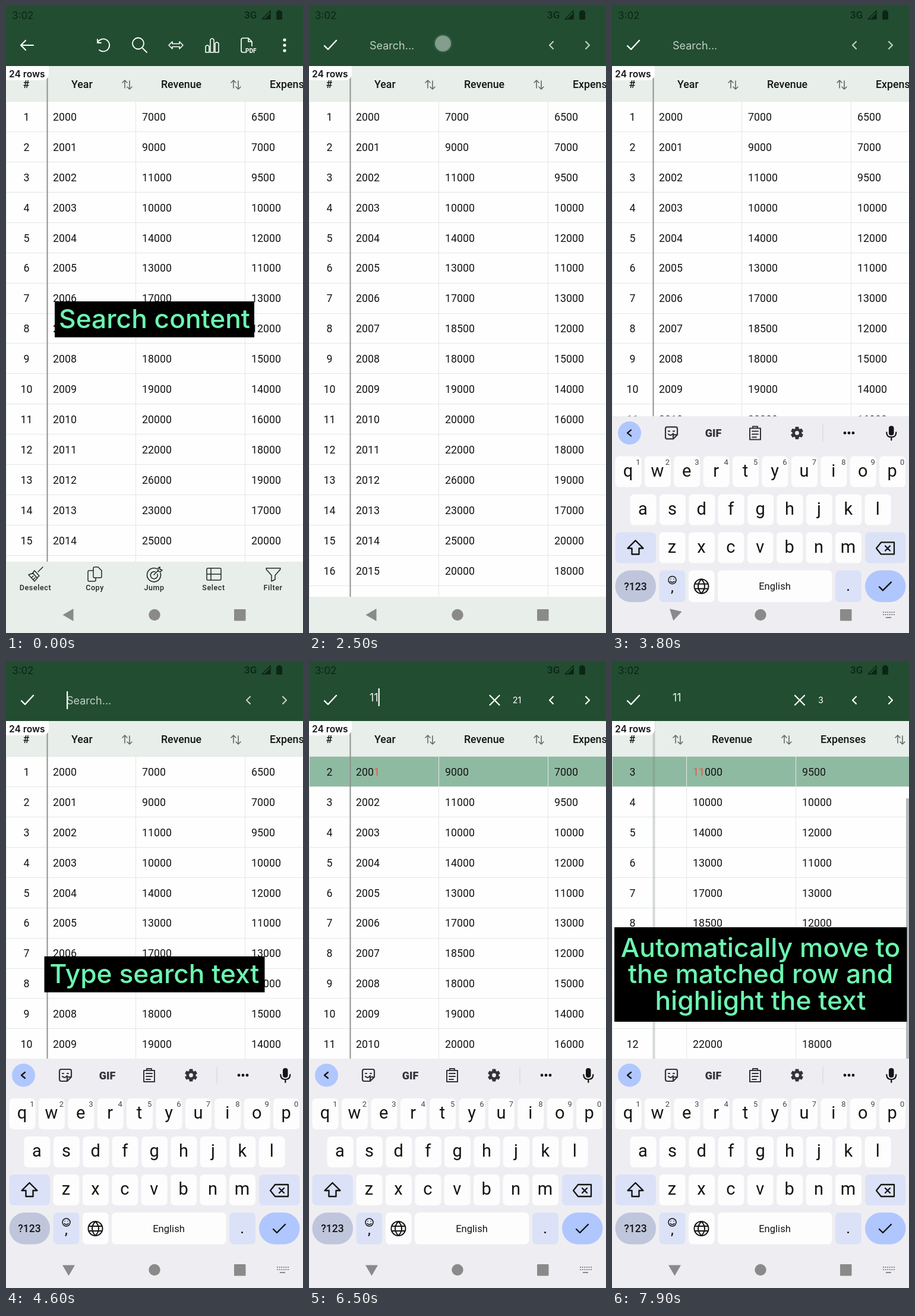
An HTML page with a canvas for the animation above (8 s loop, 500 px wide and 1055 px high).

```html
<!DOCTYPE html>
<html lang="en">
<head>
<meta charset="utf-8">
<title>Table search</title>
<style>
html, body { margin: 0; width: 100%; height: 100%; overflow: hidden; background: #e8eee9 }
canvas { display: block }
</style>
</head>
<body>
<canvas id="stage" width="500" height="1055"></canvas>
<script>
const c = document.getElementById('stage').getContext('2d');
const LOOP = 8000, TAU = Math.PI * 2;
const ROW = 50.93, HEAD = 161, KEYBOARD = 669;
const GREEN = '#224d31', PANEL = '#e8eee9', INK = '#131513', NAV = '#898a89', PALE = '#c0d0c5';
const KEY = '#fdfdfe', KEY_ALT = '#dbe2f8', KEY_BLUE = '#b0c6ff', KEY_BG = '#eeeef2', STRIP_INK = '#32343a';

const revenue = [7, 9, 11, 10, 14, 13, 17, 18.5, 18, 19, 20, 22, 26, 23, 25, 20];
const expenses = [6.5, 7, 9.5, 10, 12, 11, 13, 12, 15, 14, 16, 18, 19, 17, 20, 18];
const rows = revenue.map((r, i) => [2000 + i, r * 1000, expenses[i] * 1000].map(String));
const columns = [
  { title: 'Year', x: 79, titleX: 110, sort: 204, edge: 218 },
  { title: 'Revenue', x: 229, titleX: 261, sort: 387, edge: 402 },
  { title: 'Expenses', x: 413, titleX: 444, sort: 578, edge: 593 }
];

// Times in ms
const AT = { arrow: 1600, captionOff: 2300, touch: 2300, bar: 2500, touchOff: 2700, keys: 3600, caret: 4000,
  ask: 4600, askOff: 5700, one: 5900, eleven: 6400, match: 7000, result: 7300 };

const clamp = v => Math.max(0, Math.min(1, v));

function rect(x, y, w, h, color, radius = 0) {
  c.fillStyle = color;
  c.beginPath();
  c.roundRect(x, y, w, h, radius);
  c.fill();
}

function disc(x, y, r, color) {
  c.fillStyle = color;
  c.beginPath();
  c.arc(x, y, r, 0, TAU);
  c.fill();
}

// y is the middle of the capital letters
function text(s, x, y, size, color = INK, align = 'left', weight = 400, family = 'Roboto') {
  c.font = `${weight} ${size}px ${family}, sans-serif`;
  c.textAlign = align;
  c.fillStyle = color;
  c.fillText(s, x, y + size * 0.356);
  return c.measureText(s).width;
}

function icon(d, x, y, color, width = 2, fill) {
  c.save();
  c.translate(x, y);
  c.lineCap = c.lineJoin = 'round';
  const path = new Path2D(d);
  if (fill) { c.fillStyle = fill; c.fill(path); }
  if (width) { c.strokeStyle = color; c.lineWidth = width; c.stroke(path); }
  c.restore();
}

function clip(x, y, w, h, draw) {
  c.save();
  c.beginPath();
  c.rect(x, y, w, h);
  c.clip();
  draw();
  c.restore();
}

function line(x1, y1, x2, y2) {
  c.strokeStyle = '#e3e8e4';
  c.lineWidth = 1;
  c.beginPath();
  c.moveTo(x1, y1);
  c.lineTo(x2, y2);
  c.stroke();
}

function statusBar() {
  const dark = '#0d2517';
  text('3:02', 10, 16, 17, dark, 'left', 400, 'Inter');
  text('3G', 401, 15, 17, dark, 'left', 500);
  icon('M-7 7H7V-7Z', 438, 15, dark, 1.5);
  icon('M-3 7H7V-3Z', 438, 15, dark, 0, dark);
  rect(455, 9, 10, 14, dark, 1.5);
  rect(457.5, 7, 5, 3, dark);
}

function toolbar() {
  const w = '#fff';
  icon('M11 0H-10M-2 -8L-10 0L-2 8', 35, 66, w, 2.2);
  icon('M-10 -10V-4H-4M-10 -4A10.5 10.5 0 1 1 -7 8', 164, 66, w, 1.8);
  icon('M-12 -3A9.5 9.5 0 1 0 7 -3A9.5 9.5 0 1 0 -12 -3M5 5L12 12', 225, 66, w, 1.8);
  icon('M-12 0L-6 -6V-2.5H6V-6L12 0L6 6V2.5H-6V6Z', 286, 66, w, 1.6);
  icon('M-11 2Q-8 -2 -5 2V12H-11ZM-3 -9Q0 -14 3 -9V12H-3ZM5 -3Q8 -7 11 -3V12H5Z', 347, 66, w, 1.6);
  icon('M-4 12H-8Q-11 12 -11 9V-9Q-11 -12 -8 -12H1L7 -6V1M1 -12V-6H7', 407, 66, w, 1.7);
  text('PDF', 403, 75.5, 10, w, 'left', 700);
  for (const y of [57, 66, 75]) disc(469, y, 2.6, w);
}

function searchBar(t) {
  const found = t >= AT.eleven, tint = found ? '#fff' : PALE;
  icon('M-9 1L-3 7L11 -8', 35, 66, '#fff', 2.4);
  icon('M3 -6L-3 0L3 6', 408, 66, tint, 2.2);
  icon('M-3 -6L3 0L-3 6', 469, 66, tint, 2.2);
  const typed = t < AT.one ? '' : t < AT.eleven ? '1' : '11';
  let caretX = 103;
  if (typed) caretX += text(typed, 102, 61.5, 18, '#e8eeea', 'left', 400, 'Inter');
  else text('Search...', 102, 67, 18, PALE, 'left', 400, 'Inter');
  if (found) {
    const done = t >= AT.match;
    icon('M-8 -8L8 8M8 -8L-8 8', done ? 316 : 312.5, 66, '#fff', 2.2);
    text(done ? '3' : '21', done ? 351.5 : 350, 66, 14.5, '#fff', 'center', 400, 'Inter');
  }
  const blinkStart = found ? AT.eleven : t >= AT.one ? AT.one : AT.ask - 1000;
  if (t >= AT.caret && (t - blinkStart) % 1000 < 500)
    rect(caretX - 1, typed ? 46 : 51, 2.2, 30, '#fff');
}

function table(t, bottom) {
  const first = t < AT.eleven ? 0 : t < AT.match ? 1 : 2;
  const query = ['', '1', '11'][first];
  const shift = 93 * (1 - (1 - clamp((t - AT.match) / 200)) ** 2);
  rect(0, 101, 500, bottom - 101, '#fdfefd');
  rect(0, 101, 500, 60, PANEL);
  if (query) rect(0, HEAD, 500, ROW, '#8fbaa2');

  clip(0, 101, 500, bottom - 101, () => {
    for (let i = first; i < 17; i++) {
      const y = HEAD + (i - first) * ROW;
      line(0, Math.round(y) - .5, 500, Math.round(y) - .5);
      text(i + 1, 34.5, y + 25.5, 17.8, INK, 'center');
    }
    line(.5, HEAD, .5, bottom);
    text('#', 34, 132, 17.8, INK, 'center', 500);
  });

  clip(70, 101, 430, bottom - 101, () => {
    c.translate(-shift, 0);
    columns.forEach((col, k) => {
      text(col.title, col.titleX, 131.5, 17.8, INK, 'left', 500);
      icon('M-4 6V-7M-8 -3L-4 -7L0 -3M4 -6V8M0 4L4 8L8 4', col.sort, 132, '#656a67', 1.6);
      line(col.edge + .5, HEAD, col.edge + .5, bottom);
      rows.slice(first).forEach((row, i) => {
        const y = HEAD + 25.5 + i * ROW, s = row[k];
        const at = query && i === 0 && k === first - 1 ? s.indexOf(query) : -1;
        if (at < 0) return text(s, col.x, y, 17.8);
        let x = col.x + text(s.slice(0, at), col.x, y, 17.8);
        x += text(query, x, y, 17.8, '#f0553c');
        text(s.slice(at + query.length), x, y, 17.8);
      });
    });
  });

  const moved = shift > 0;
  rect(68.5, 101, moved ? 4 : 2, bottom - 101, moved ? 'rgba(120,128,122,.3)' : '#8e928f');
  if (moved) rect(495, 231, 5, bottom - 231, '#b8bab9');
  rect(0, 101, 72, 24, '#fff', [0, 0, 10, 0]);
  text('24 rows', 5, 114, 15.6, '#111', 'left', 600, 'Inter');
}

function actions() {
  const ink = '#1f2a23';
  rect(0, 935, 500, 60, PANEL);
  c.letterSpacing = '.6px';
  ['Deselect', 'Copy', 'Jump', 'Select', 'Filter'].forEach((label, i) =>
    text(label, 49.5 + i * 100, 979, 12.5, ink, 'center', 500));
  c.letterSpacing = '0px';
  icon('M12 -12L4 -4M-2 -6L6 3L2 6L-5 -2ZM-4 -2L-12 1L-2 12L3 6M-7 6L-4 3M-4 9L-1 6', 50, 956, ink, 1.5);
  icon('M0 -12H6L12 -6V4Q12 6 10 6H0Q-2 6 -2 4V-10Q-2 -12 0 -12M-2 -6H-9Q-11 -6 -11 -4V10Q-11 12 -9 12H0Q2 12 2 10V6', 149, 956, ink, 1.5);
  icon('M5 -10A11.5 11.5 0 1 0 11 -3M2 -5A6 6 0 1 0 6 -1M0 0L7 -7V-11L10 -13V-9L14 -8L11 -5L7 -6', 249, 957, ink, 1.6);
  icon('M-10 -10H10Q12 -10 12 -8V8Q12 10 10 10H-10Q-12 10 -12 8V-8Q-12 -10 -10 -10M-5 -10V10M-12 0H12', 350, 956, ink, 1.5);
  icon('M-12 -10H12Q12 -7 10 -6L3 2V9L-3 12V2L-10 -6Q-12 -7 -12 -10Z', 450, 956, ink, 1.5);
}

function keyStrip() {
  const y = 697;
  disc(29.5, y, 19.5, KEY_BLUE);
  icon('M3 -5L-3 0L3 5', 29, y, INK, 2.3);
  icon('M-7 -10H7Q10 -10 10 -7V3L3 10H-7Q-10 10 -10 7V-7Q-10 -10 -7 -10M10 3H5Q3 3 3 5V10M-5 -3H-3M3 -3H5M-5 2Q-1 6 3 1', 100, y, STRIP_INK, 2.2);
  text('GIF', 170.5, y + .5, 18, STRIP_INK, 'center', 900);
  icon('M-9 -8H9V11H-9ZM-4 -8V-11H4V-8M-5 -3H5M-5 2H5M-5 7H2', 241, y, STRIP_INK, 2);
  c.save();
  c.translate(311.5, y);
  for (let i = 0; i < 6; i++) {
    c.rotate(TAU / 6);
    rect(-3, -10.5, 6, 8, STRIP_INK, 1);
  }
  c.restore();
  disc(311.5, y, 8, STRIP_INK);
  disc(311.5, y, 3.4, KEY_BG);
  rect(354.5, 683, 1, 29, '#d0d1d6');
  for (const x of [392, 399, 406]) disc(x, y, 2.4, INK);
  rect(466, 685, 8.5, 16, INK, 4);
  icon('M-8 -1Q-8 7 0 7Q8 7 8 -1M0 7V12', 470.3, y, INK, 2.2);
}

function keyRow(letters, x, y, digits) {
  [...letters].forEach((letter, i) => {
    const left = x + i * 49.4;
    rect(left, y, 44, 52, KEY, 7);
    text(letter, left + 21.5, y + 24, 29, INK, 'center');
    if (digits) text((i + 1) % 10, left + 38.5, y + 9.5, 13, '#44464c', 'center');
  });
}

function keyboard(offset) {
  c.save();
  c.translate(0, offset);
  rect(0, KEYBOARD, 500, 386, KEY_BG);
  keyStrip();
  keyRow('qwertyuiop', 5.5, 736, true);
  keyRow('asdfghjkl', 30.5, 800);
  keyRow('zxcvbnm', 79.5, 864);
  rect(5.5, 864, 68.5, 52, KEY_ALT, 7);
  icon('M0 -12L13 1H6V11H-6V1H-13Z', 39.5, 890, INK, 2.4);
  rect(426, 864, 68.5, 52, KEY_ALT, 7);
  icon('M-7 -10H15V10H-7L-15 0ZM0 -4L8 4M8 -4L0 4', 460, 891, INK, 2.3);

  rect(5.5, 928, 68.5, 53.5, '#bfc6dc', 26);
  text('?123', 39.5, 955, 17.5, INK, 'center', 500);
  rect(79.5, 928, 44, 53.5, KEY_ALT, 7);
  icon('M-6.5 0A6.5 6.5 0 1 0 6.5 0A6.5 6.5 0 1 0 -6.5 0M-2.5 -2V-1.9M2.5 -2V-1.9M-3.5 2Q0 5.5 3.5 2', 101.5, 944.5, INK, 1.5);
  text(',', 101.5, 957, 22, INK, 'center', 500);
  rect(129, 928, 43.5, 53.5, KEY, 7);
  icon('M-12 0A12 12 0 1 0 12 0A12 12 0 1 0 -12 0M0 -12Q-11 0 0 12Q11 0 0 -12M-11 -4H11M-11 4H11', 150.5, 955, INK, 2);
  rect(178, 928, 192.5, 53.5, KEY, 7);
  text('English', 274, 955, 16.6, INK, 'center');
  rect(376, 928, 44, 53.5, KEY_ALT, 7);
  text('.', 397.5, 955, 22, INK, 'center', 500);
  rect(426, 928, 68.5, 53.5, KEY_BLUE, 27);
  icon('M-10 1L-4 7L10 -7', 460, 955, INK, 2.4);
  c.restore();
}

function navigation(shown) {
  c.save();
  c.translate(105.5, 1024.5);
  c.rotate(-shown * Math.PI / 2);
  icon('M-10 0L8 -10.5V10.5Z', 0, 0, NAV, 0, NAV);
  c.restore();
  disc(250, 1024.5, 9.7, NAV);
  rect(384, 1015, 19.5, 19.5, NAV, 1);
  if (shown > .5) {
    for (let i = 0; i < 12; i++)
      rect(456 + i % 6 * 3.6, 1019 + Math.floor(i / 6) * 4, 2, 2, NAV);
    rect(461, 1028, 9, 2, NAV);
  }
}

function caption(x, y, w, h, ...lines) {
  rect(x, y, w, h, '#000');
  lines.forEach((s, i) =>
    text(s, 250, y + h / 2 - 1 + (i - (lines.length - 1) / 2) * 44.3, 44.3, '#6cf6b0', 'center', 500, 'Inter'));
}

function render(t) {
  const searching = t >= AT.bar, typing = t >= AT.keys;
  const progress = clamp((t - AT.keys) / 325);
  const offset = 386 * (1 - progress) ** 3;
  const bottom = typing ? Math.min(994, KEYBOARD + offset) : searching ? 994 : 935;

  rect(0, 0, 500, 1055, PANEL);
  rect(0, 0, 500, 101, GREEN);
  statusBar();
  if (searching) searchBar(t); else toolbar();
  table(t, bottom);
  if (!searching) actions();
  if (typing) keyboard(offset);
  navigation(1 - (1 - progress) ** 2);

  if (t >= AT.arrow && t < AT.captionOff)
    icon('M0 -36L20 -3Q21 0 18 0H9L21 37Q22 41 18 41H-15Q-19 41 -18 37L-7 0H-18Q-21 0 -20 -3Z', 226.5, 114, '#c12a0c', 5, '#fff');
  if (t >= AT.touch && t < AT.touchOff) {
    c.save();
    c.shadowColor = 'rgba(170,195,180,.6)';
    c.shadowBlur = 4;
    disc(225.5, 63, 13.5, 'rgba(150,172,158,.7)');
    c.restore();
  }
  if (t < AT.captionOff) caption(82, 497, 336, 60.5, 'Search content');
  if (t >= AT.ask && t < AT.askOff) caption(64.5, 497, 371, 60.5, 'Type search text');
  if (t >= AT.result)
    caption(4, 448, 492.5, 159, 'Automatically move to', 'the matched row and', 'highlight the text');
}

function frame() {
  render(performance.now() % LOOP);
  requestAnimationFrame(frame);
}
frame();
</script>
</body>
</html>
```
